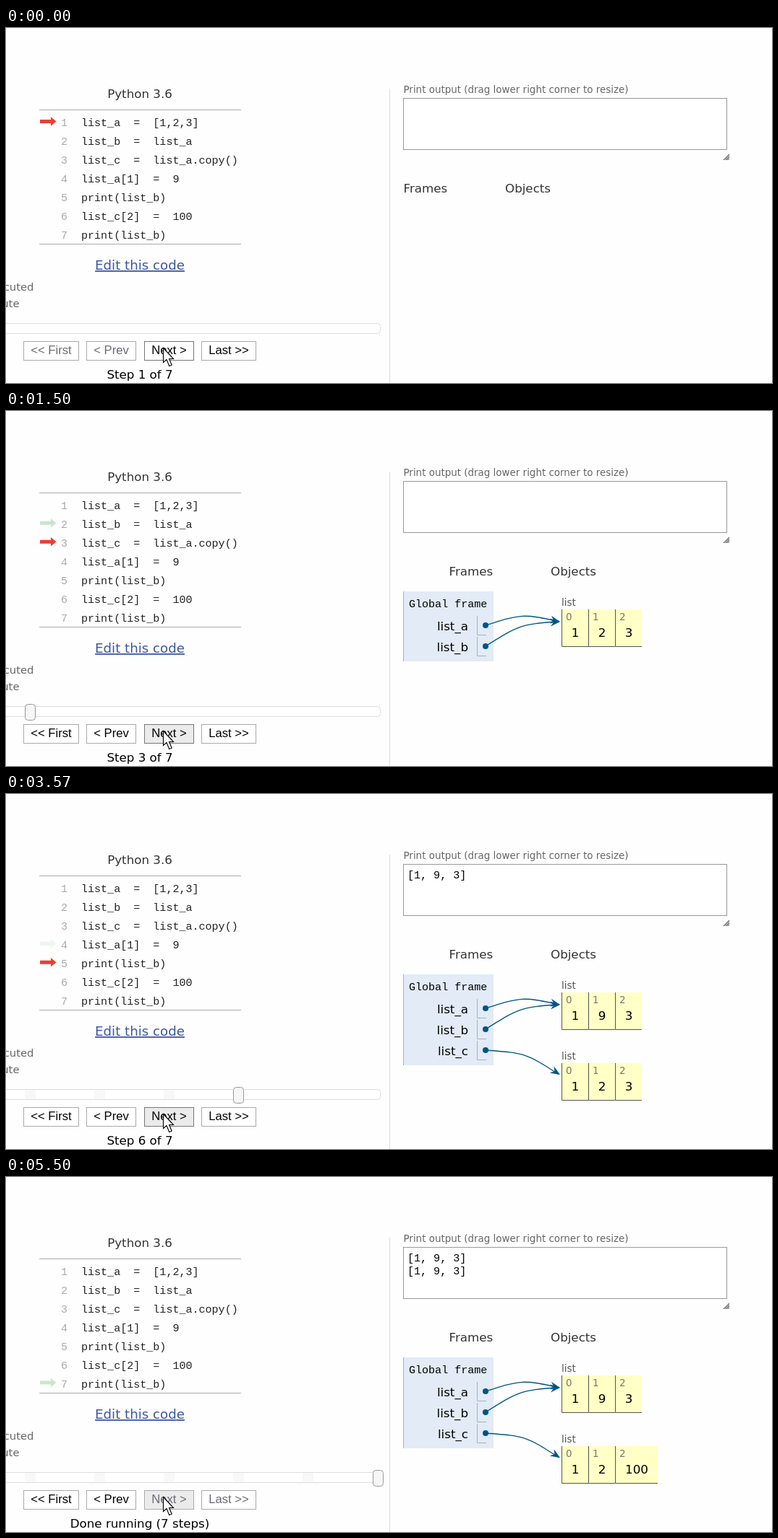
An HTML page for the animation above (6130 ms loop, 1059 px wide and 492 px high).

```html
<!DOCTYPE html>
<html lang="en">
<head>
<meta charset="utf-8">
<title>Stepping through list aliasing</title>
<style>
  html, body { margin: 0; width: 100%; height: 100%; overflow: hidden; background: #fefefe; }
  svg { display: block; width: 1059px; height: 492px; }
  text { font: 16.7px "DejaVu Sans", sans-serif; white-space: pre; }
  .mono { font: 15.05px "Liberation Mono", monospace; }
  .button { font: 16.67px "Liberation Sans", sans-serif; }
  .small { font-size: 13.45px; }
  .legend { font-size: 14.8px; }
  .link { font-size: 18.2px; text-decoration: underline; }
</style>
</head>
<body>
<svg id="stage" viewBox="0 0 1059 492"></svg>
<script>
const LOOP = 6130, TICK = 76.5;
// press: highlight appears; update: next step is shown; lead: arrow animation already under way
const clicks = [
  { press: 230, update: 320 },
  { press: 960, update: 1040 },
  { press: 1650, update: 1730 },
  { press: 2420, update: 2570, lead: TICK },
  { press: 3340, update: 3430 },
  { press: 4350, update: 4430 },
  { press: 5200, update: 5270 },
];
const source = ['list_a  =  [1,2,3]', 'list_b  =  list_a', 'list_c  =  list_a.copy()',
  'list_a[1]  =  9', 'print(list_b)', 'list_c[2]  =  100', 'print(list_b)'];
const BLUE = '#005583', RED = '#e93f34', GREEN = [201, 230, 202];

const clamp = x => Math.min(1, Math.max(0, x));
const easeCubic = x => x < .5 ? 4 * x ** 3 : 1 - 4 * (1 - x) ** 3;

const text = (x, y, s, fill = '#000', cls = '', anchor = 'start') =>
  `<text x="${x}" y="${y}" fill="${fill}" class="${cls}" text-anchor="${anchor}">${
    String(s).replace(/</g, '&lt;').replace(/>/g, '&gt;')}</text>`;
const rect = (x, y, w, h, fill, stroke = 'none', r = 0) =>
  `<rect x="${x}" y="${y}" width="${w}" height="${h}" rx="${r}" fill="${fill}" stroke="${stroke}"/>`;
const line = (d, stroke, width = 1) =>
  `<path d="${d}" fill="none" stroke="${stroke}" stroke-width="${width}"/>`;

const lineArrow = (row, fill) =>
  `<path transform="translate(47 ${123.2 + 25.92 * row})" fill="${fill}"
    d="M0 3.75H15V0L22.5 6.25L15 12.5V8.75H0Z"/>`;

// Both control points sit together, a little above the middle of the chord.
function pointer(y, endY) {
  const x = 663, endX = 766, bend = 13.5;
  const dx = endX - x, dy = endY - y, length = Math.hypot(dx, dy);
  const cx = (x + endX) / 2 + bend * dy / length;
  const cy = (y + endY) / 2 - bend * dx / length;
  const angle = Math.atan2(endY - cy, endX - cx) * 180 / Math.PI;
  return `<circle cx="${x}" cy="${y}" r="4" fill="${BLUE}"/>`
    + line(`M${x} ${y}C${cx} ${cy} ${cx} ${cy} ${endX - 2} ${endY - .5}`, BLUE, 1.4)
    + `<path transform="translate(${endX} ${endY}) rotate(${angle})" fill="${BLUE}"
        d="M0 0L-13.5-5.5L-9 0L-13.5 5.5Z"/>`;
}

function listObject(top, values) {
  let x = 768, out = text(768, top - 5, 'list', '#555', 'small');
  values.forEach((value, i) => {
    const width = value > 9 ? 59 : 37;
    out += rect(x, top, width, 52, '#ffffc6')
      + line(`M${x + .5} ${top}V${top + 51.5}H${x + width}`, '#555')
      + text(x + 6, top + 15, i, '#777', 'small')
      + text(x + 19 + (width - 37) / 2, top + 38, value, '#000', '', 'middle');
    x += width;
  });
  return out;
}

const button = (x, width, label, enabled, fill = '#fff', border = '#aaa') =>
  rect(x + .5, 434.5, width, 26, fill, border)
  + text(x + width / 2 + .5, 452, label, enabled ? '#000' : '#6b6b75', 'button', 'middle');

function codePane(step, elapsed) {
  let out = text(185, 97, 'Python 3.6', '#333', '', 'middle')
    + line('M46 113.5H325M46 299.5H325', '#aaa');
  if (elapsed >= 200) {
    if (step > 0) out += lineArrow(step - 1, `rgb(${GREEN})`);
  } else if (step > 1) {
    const fade = easeCubic(clamp(elapsed / 200));
    out += lineArrow(step - 2, `rgb(${GREEN.map(c => Math.round(c + (254 - c) * fade))})`);
  }
  if (step < 7) {
    const slide = step ? easeCubic(clamp((elapsed - 200) / 250)) : 1;
    out += lineArrow(step - 1 + slide, RED);
  }
  source.forEach((code, i) => {
    const y = 135.5 + 26 * i;
    out += text(76, y, i + 1, '#aaa', 'mono') + text(104, y, code, '#222', 'mono');
  });
  return out + text(185, 335, 'Edit this code', '#3d58a2', 'link', 'middle')
    + text(38.5, 364, 'line that just executed', '#666', 'legend', 'end')
    + text(18.5, 387, 'next line to execute', '#666', 'legend', 'end');
}

function controls(step, pressed, touched) {
  const handleX = i => Math.floor(26 + 96.2 * (i - 2));
  const done = step === 7;
  const nextFill = pressed ? '#f5f5f5' : touched ? '#ebebeb' : '#fff';
  let out = rect(-10, 409.5, 527.5, 14, '#fff', '#ddd', 4);
  for (let i = 2; i < step; i++) out += rect(handleX(i), 410, 15, 13, '#f8f8f8');
  if (step > 1) out += rect(handleX(step) + .5, 406.5, 14, 22, '#f6f6f6', '#999', 4);
  out += button(24, 76, '<< First', step > 0)
    + button(111, 68, '< Prev', step > 0)
    + button(191, 68, 'Next >', !done, nextFill, done ? '#aaa' : '#777')
    + button(270, 75, 'Last >>', !done)
    + text(185, 486, done ? 'Done running (7 steps)' : `Step ${step + 1} of 7`, '#000', '', 'middle');
  if (pressed) out += '<circle cx="217" cy="445" r="16" fill="#fff000" opacity=".65"/>';
  return out + `<path transform="translate(217.5 443.5)" fill="#fff" stroke="#000" stroke-width="1.1"
    d="M0 0V20L4.5 16L8.2 25L11.7 23.5L8 15H14Z"/>`;
}

function dataPane(step) {
  const printed = (step >= 5) + (step >= 7), variables = Math.min(step, 3);
  const shift = step ? 63 : 0;
  let out = line('M530.5 84V492', '#ddd')
    + text(549.5, 90, 'Print output (drag lower right corner to resize)', '#666', 'small')
    + rect(549.5, 97.5, 447, 71, '#fff', '#999')
    + '<path d="M991 183L1000 174V183Z" fill="#aaa"/>'
    + line('M992 183L1000 175M995.5 183L1000 178.5', '#666')
    + text(549.5 + shift, 228, 'Frames', '#333')
    + text(690 + shift, 228, 'Objects', '#333');
  for (let i = 0; i < printed; i++) out += text(555, 116.5 + 18 * i, '[1, 9, 3]', '#000', 'mono');
  if (!step) return out;

  const height = 39 + 29 * variables;
  out += rect(549, 250, 125, height, '#e2ebf6')
    + line(`M549.5 250V${250 + height}`, '#a6b3b6')
    + text(557, 272, 'Global frame', '#000', 'mono');
  for (let i = 0; i < variables; i++) {
    const y = 29 * i;
    out += text(639, 304 + y, 'list_' + 'abc'[i], '#000', '', 'end')
      + line(`M651.5 ${284 + y}V${310.5 + y}H664`, '#a6b3b6');
  }
  out += listObject(275, [1, step >= 4 ? 9 : 2, 3]) + pointer(297, 292);
  if (step >= 2) out += pointer(326, 292);
  if (step >= 3) out += listObject(373, [1, 2, step >= 6 ? 100 : 3]) + pointer(355, 389);
  return out;
}

function scene(time) {
  const step = clicks.filter(c => c.update <= time).length;
  const pressed = clicks.some(c => c.press <= time && time < c.update);
  let elapsed = 0;
  if (step) {
    const { update, lead = 0 } = clicks[step - 1];
    elapsed = 35 + lead + Math.floor((time - update) / TICK) * TICK;
  }
  return codePane(step, elapsed) + dataPane(step)
    + controls(step, pressed, time >= clicks[0].press);
}

const stage = document.getElementById('stage');
const start = performance.now();
let shown = '';
function draw() {
  const markup = scene((performance.now() - start) % LOOP);
  if (markup !== shown) stage.innerHTML = shown = markup;
  requestAnimationFrame(draw);
}
draw();
</script>
</body>
</html>
```
